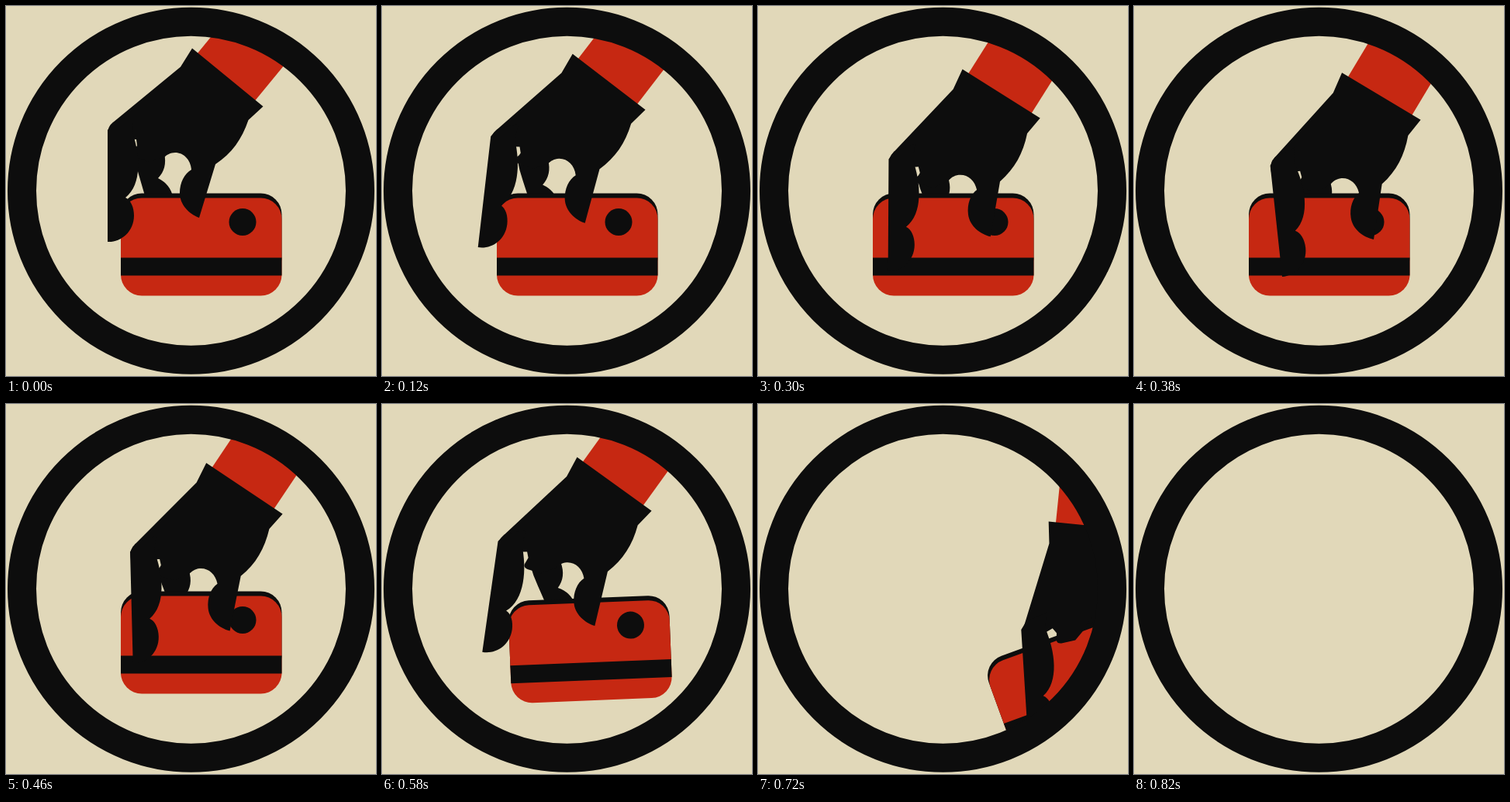
An HTML page for the animation above (840 ms loop, 477 by 477 pixels).

```html
<!DOCTYPE html>
<html lang="en">
<head>
<meta charset="utf-8">
<title>Card grab</title>
<style>
  html, body { margin: 0; width: 100%; height: 100%; overflow: hidden; background: #e1d8b9; }
  svg { display: block; width: 100vw; height: 100vh; }
  .ink { fill: #0d0d0d; }
  .red { fill: #c62812; }
</style>
</head>
<body>
<svg viewBox="0 0 477 477">
  <clipPath id="lens"><circle cx="238.5" cy="238.3" r="218"/></clipPath>
  <rect width="477" height="477" fill="#e1d8b9"/>
  <g clip-path="url(#lens)">
    <g id="back">
      <path id="middle" class="ink" d="M164 185 L167 202 L171 217 L178 241 L184 264 H215 V246 Q212 230 196 222 C204 214 207 203 204 190 L195 165Z"/>
    </g>
    <g id="card">
      <rect class="ink" x="148" y="241.5" width="207.5" height="110" rx="27"/>
      <rect class="red" x="148" y="247.5" width="207.5" height="126" rx="27"/>
      <rect class="ink" x="148" y="324.5" width="207.5" height="23"/>
      <circle class="ink" cx="305" cy="278.5" r="17.5"/>
    </g>
    <g id="hand">
      <path class="red" d="M241.5 67.5 L317 127 L576 -188 L500.5 -247.5Z"/>
      <path class="ink" d="M240 54.5 L331.5 129.5 L312.5 147 C304 172 291 190 270 204 L249 273
        C236 268 224 256 224 241 C224 228 230 216 239 211 C238 198 229 189 218 189
        C212 189 207 192 204 195 L184 201 L167 194.5 Q162 192 163.5 188 L169 180
        L168 172 L131 170 V165 Q131 155 138 150 L225 78.5Z"/>
      <path id="finger" class="ink" d="M131 160 V304 C147 305 165 292 165 270 C165 260 161 250 154 247
        C176 230 173 190 162 160 L165 140 L138 150Z"/>
    </g>
  </g>
  <circle cx="238.5" cy="238.3" r="218" fill="none" stroke="#0d0d0d" stroke-width="37"/>
</svg>
<script>
  const LOOP = 840, STEP = 20, SHOULDER = [468, -120];
  const el = id => document.getElementById(id);
  const [back, middle, card, hand, finger] = ['back', 'middle', 'card', 'hand', 'finger'].map(el);

  // Eased value between [time, value] keys
  function ease(keys, t) {
    let i = 1;
    while (i < keys.length - 1 && t > keys[i][0]) i++;
    const [t0, v0] = keys[i - 1], [t1, v1] = keys[i];
    const u = Math.min(1, Math.max(0, (t - t0) / (t1 - t0)));
    return v0 + (v1 - v0) * u * u * (3 - 2 * u);
  }

  const swing = [[0, 0], [400, 8.5], [540, 1.2], [840, 51.2]];
  const spread = [[0, 0], [200, 13], [400, 2], [600, 12], [720, 30]];

  function turn(node, deg, [x, y]) {
    node.setAttribute('transform', `rotate(${deg.toFixed(3)} ${x} ${y})`);
  }

  function draw(t) {
    const pull = Math.max(0, (t - 540) / 300);
    const arm = -ease(swing, t);
    turn(hand, arm, SHOULDER);
    turn(back, arm, SHOULDER);
    turn(finger, ease(spread, t), [149, 160]);
    turn(middle, -16 * pull ** 0.7, [185, 95]);
    turn(card, -42 * pull ** 1.45, [480, -110]);
  }

  const start = performance.now();
  function tick() {
    const t = (performance.now() - start) % LOOP;
    draw(Math.floor(t / STEP) * STEP);
    requestAnimationFrame(tick);
  }
  draw(0);
  requestAnimationFrame(tick);
</script>
</body>
</html>
```
